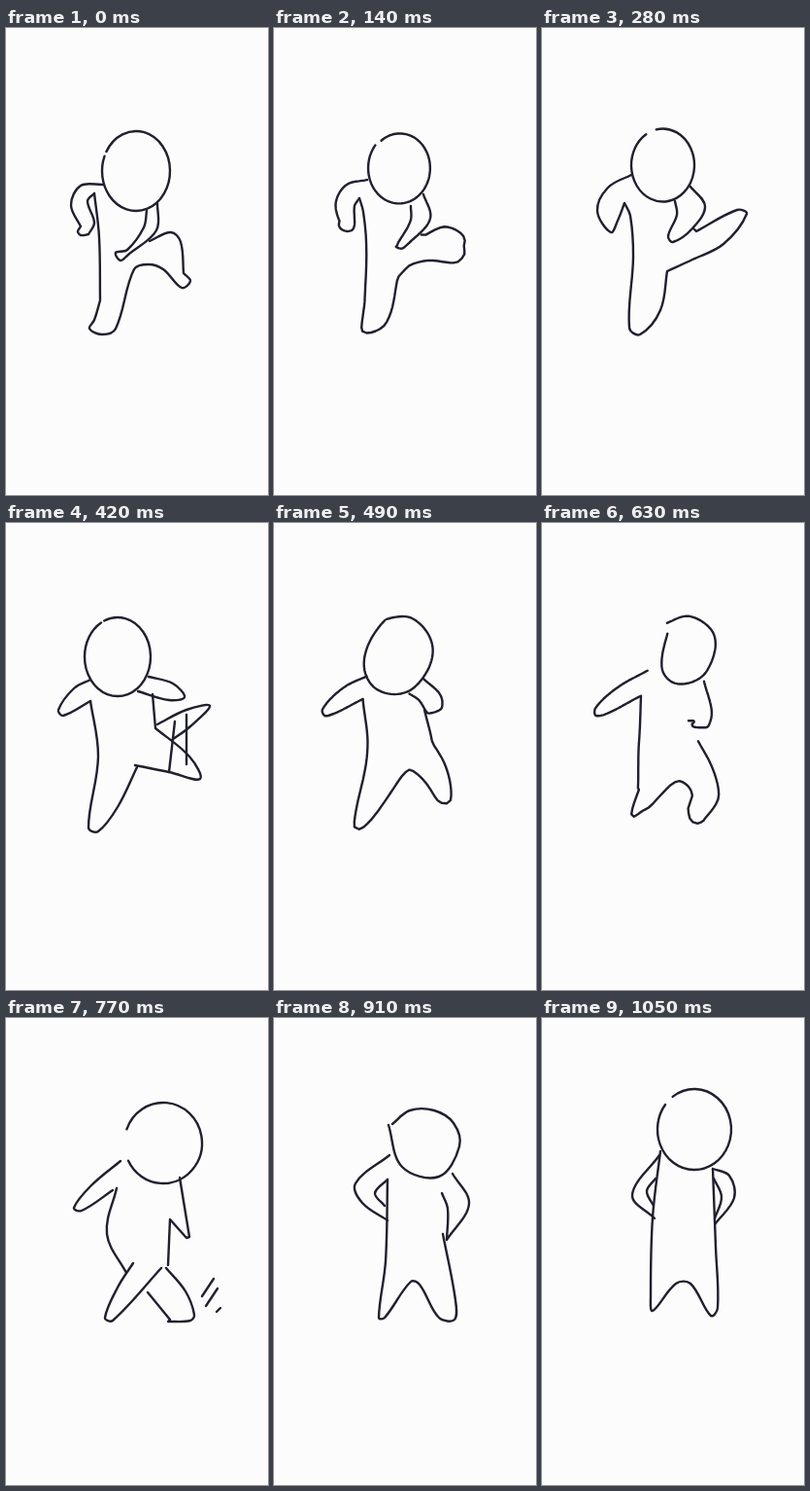
Write an HTML page that moves like this. It is 270 px wide and 480 px high and loops after 1120 ms.

```html
<!DOCTYPE html>
<html lang="en">
<head>
<meta charset="utf-8">
<title>Doodle dancer</title>
<style>
  html, body { margin: 0; width: 100%; height: 100%; overflow: hidden; background: #fcfcfc; }
  svg { display: block; width: 100%; height: 100%; }
  path { fill: none; stroke: #20202e; stroke-width: 2.4; stroke-linecap: round; stroke-linejoin: round; }
</style>
</head>
<body>
<svg viewBox="0 0 270 480"></svg>
<script>
const STEP = 70, STEPS = 16, SAMPLES = 72;
const PARTS = ['head', 'leftArm', 'body', 'rightArm'];

// Smooth curve through a few points: "!" marks a sharp corner, "|" lifts the pen.
function curve(text) {
  return text.split('|').map(stroke => {
    const points = stroke.trim().split(' ').map(token => {
      const [x, y] = token.replace('!', '').split(',').map(Number);
      return { x, y, sharp: token.endsWith('!') };
    });
    const distance = (a, b) => Math.hypot(b.x - a.x, b.y - a.y);
    const control = (i, j) => {
      const p = points[i], q = points[j], back = points[2 * i - j];
      if (p.sharp || !back) return `${p.x + (q.x - p.x) / 3} ${p.y + (q.y - p.y) / 3}`;
      const ahead = distance(p, q);
      const k = ahead / (ahead + distance(p, back)) / 3 * 1.1;
      return `${p.x + (q.x - back.x) * k} ${p.y + (q.y - back.y) * k}`;
    };
    return points.map((p, i) => i
      ? `C${control(i - 1, i)} ${control(i, i - 1)} ${p.x} ${p.y}`
      : `M${p.x} ${p.y}`).join('');
  }).join('');
}

// Clockwise ellipse from an angle, leaving a gap (both in degrees).
function oval(cx, cy, rx, ry, from, gap) {
  const at = degrees => {
    const a = degrees * Math.PI / 180;
    return `${cx + rx * Math.cos(a)} ${cy + ry * Math.sin(a)}`;
  };
  const arc = `A${rx} ${ry} 0 0 1 `;
  return `M${at(from)}${arc}${at(from + 150)}${arc}${at(from + 300 - gap)}${arc}${at(from - gap)}`;
}

const highKnee = {
  step: 0,
  head: oval(134, 147, 35, 41, 209, 7),
  leftArm: curve('100,161 77,162 67,182 77,204! 74,209 77,213 85,212! 91,200 84,178 91,170'),
  body: curve('91,170 96,215 97,280! 91,300 86,309 99,315 113,309 132,248 147,243 162,248 181,267 190,260 183,252! 180,220 170,210 148,219'),
  rightArm: curve('156,180 155,208 126,233! 118,239 113,231 125,228 142,205 145,188')
};

const kick = {
  step: 4,
  head: oval(124.5, 141, 32.5, 37.5, 258, 20),
  leftArm: curve('92,151 68,164 57,188 71,210 78,198 85,180'),
  body: curve('85,180 91,193 94,235 90,308 101,315 122,290 129,250! 155,238 187,222 211,191 201,187 159,209! 156,206'),
  rightArm: curve('152,162 168,183 155,206 135,220 130,214 139,192 137,178')
};

const swing = {
  step: 6,
  head: oval(115, 137.5, 34, 40.5, 246, 6),
  leftArm: curve('87,161 70,170 54,192 59,198 87,183'),
  body: curve('87,183 95,240 85,313 95,317 115,292 135,251 | 133,249 168,256 200,263 189,240 154,211! 151,176'),
  rightArm: curve('147,158 172,165 184,179 168,182 136,173'),
  marks: curve('156,207 186,192 210,188 190,209 171,223 | 174,204 168,256 | 186,197 186,248')
};

const lean = {
  step: 8,
  head: curve('131,97 159,97 179,129 155,167 130,174 108,164 104,139 131,97'),
  leftArm: curve('104,154 70,170 46,191 49,199 96,179'),
  body: curve('96,179 98,229 80,309 86,312 133,259 145,256 154,275 151,310 162,311 176,270 172,240 159,208'),
  rightArm: curve('161,162 169,192 148,209 151,188 143,178'),
  marks: curve('176,245 155,285 | 174,250 186,282 175,279 | 185,258 168,287')
};

const stride = {
  step: 11,
  head: oval(162, 128.5, 40, 41.5, 200, 46),
  leftArm: curve('118,147 88,172 70,195 78,198 110,177'),
  body: curve('114,175 104,222 124,262 | 131,252 115,277 102,308 110,311 160,257 | 146,282 169,310! 167,312! 190,311 194,305 185,281 165,257'),
  rightArm: curve('179,164 189,225! 186,226! 169,207! 167,254'),
  marks: curve('214,268 202,286 | 218,278 206,296 | 221,298 217,302')
};

const handsOnHips = {
  step: 13,
  head: curve('122,109 140,95 165,95 185,108 191,132 170,163 132,153 118,110'),
  leftArm: curve('119,141 84,170 91,190 117,208 | 114,193 104,180 117,166'),
  body: curve('117,166 115,250 108,308 114,308 141,271 150,274 170,308 186,310 187,290 174,222'),
  rightArm: curve('184,160 201,191 178,228! 179,196 173,180')
};

const standTall = {
  step: 15,
  head: oval(157, 114.5, 38, 41.5, 234, 16),
  leftArm: curve('121,141 93,182 116,206 | 115,193 108,178 117,165'),
  body: curve('122,137 114,205 112,285 114,301 138,273 153,273 174,306 181,298 179,235 176,155'),
  rightArm: curve('176,155 193,162 198,185 179,211 | 178,206 185,184 177,165')
};

const poses = [highKnee, kick, swing, lean, stride, handsOnHips, standTall];
const svg = document.querySelector('svg');
const addPath = () => svg.appendChild(document.createElementNS(svg.namespaceURI, 'path'));
const strokes = Object.fromEntries([...PARTS, 'marks'].map(name => [name, addPath()]));

function samplePath(d) {
  const path = addPath();
  path.setAttribute('d', d);
  const length = path.getTotalLength();
  const points = Array.from({ length: SAMPLES + 1 }, (_, i) => path.getPointAtLength(length * i / SAMPLES));
  path.remove();
  return points;
}

function blend(from, to, t) {
  const a = samplePath(from), b = samplePath(to);
  const mix = (u, v) => (u + (v - u) * t).toFixed(1);
  return 'M' + a.map((p, i) => `${mix(p.x, b[i].x)} ${mix(p.y, b[i].y)}`).join('L');
}

function makeDrawing(step) {
  const next = poses.findIndex(pose => pose.step >= step);
  const to = poses[next];
  if (to.step === step) return to;
  const from = poses[next - 1];
  const t = (step - from.step) / (to.step - from.step);
  return Object.fromEntries(PARTS.map(name => [name, blend(from[name], to[name], t)]));
}

const drawings = Array.from({ length: STEPS }, (_, step) => makeDrawing(step));
let shown = -1;

function render(time) {
  const step = Math.floor(time / STEP) % STEPS;
  if (step === shown) return;
  shown = step;
  for (const name in strokes) strokes[name].setAttribute('d', drawings[step][name] || '');
}

const start = performance.now();
function tick() {
  render(performance.now() - start);
  requestAnimationFrame(tick);
}
tick();
</script>
</body>
</html>
```
